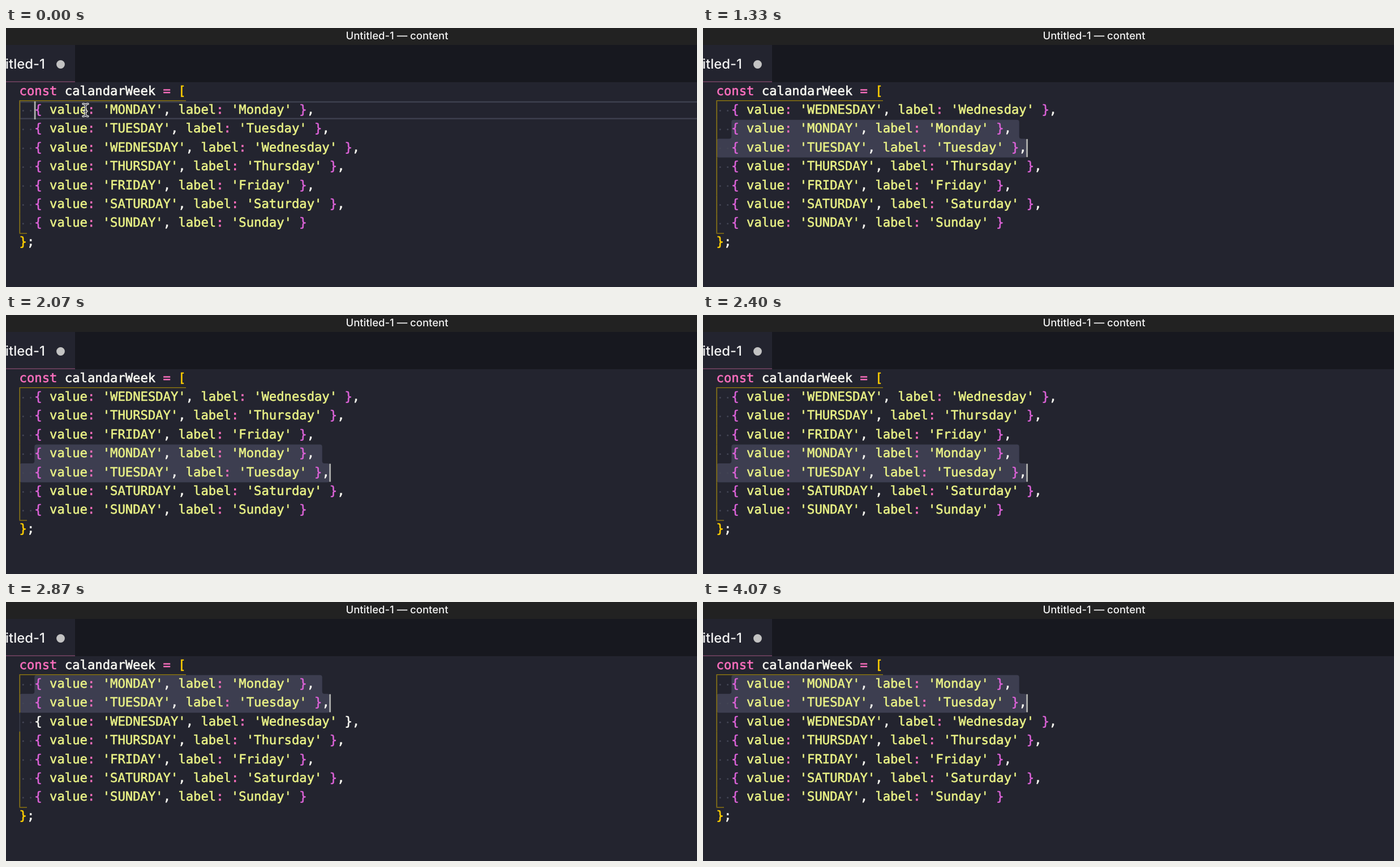
An HTML page for the animation above (4140 ms loop, 1221 px wide and 459 px high).

```html
<!DOCTYPE html>
<html lang="en">
<head>
<meta charset="utf-8">
<title>Moving lines in an editor</title>
<style>
  html, body { margin: 0; width: 100%; height: 100%; overflow: hidden; background: #23242f; }
  svg { display: block; width: 1221px; height: 459px; }
  text { white-space: pre; text-rendering: geometricPrecision; }
  .ui { font-family: Inter, sans-serif; font-weight: 500; fill: #f2f2f2; }
  .code text {
    font: 22.21px "DejaVu Sans Mono", monospace;
    stroke-width: 0.6;
  }
  .code text, .fresh .pair { fill: #f8f8f2; stroke: #f8f8f2; }
  .key { fill: #fb6fbe; stroke: #fb6fbe; }
  .str { fill: #e8f085; stroke: #e8f085; }
  .gold { fill: #ffcf00; stroke: #ffcf00; }
  .pair { fill: #da62d6; stroke: #da62d6; }
  .dots { fill: #434554; }
  .guide { stroke: #8a7410; stroke-width: 1.6; fill: none; }
  .dim { stroke: #3a3c49; }
  .line { fill: none; stroke: #3e404f; stroke-width: 2.4; }
  .sel { fill: #3d3e50; }
  .caret { fill: #aeafad; }
</style>
</head>
<body>
<svg viewBox="0 0 1221 459">
  <defs>
    <path id="beam" fill="none" stroke-linecap="round" d="M136 134.5Q140.5 134.5 140.5 138V153Q140.5 156.5 136 156.5M145 134.5Q140.5 134.5 140.5 138M145 156.5Q140.5 156.5 140.5 153M138 147.5H143"/>
  </defs>
  <rect width="1221" height="459" fill="#23242f"/>
  <rect width="1221" height="31" fill="#222"/>
  <rect y="30" width="1221" height="66" fill="#17181f"/>
  <rect y="30" width="122" height="66" fill="#23242f"/>
  <rect y="94.6" width="122" height="1.4" fill="#7d4768"/>
  <text class="ui" x="691" y="20" font-size="18.5" text-anchor="middle">Untitled-1 — content</text>
  <text class="ui" x="69" y="72" font-size="23.9" text-anchor="end">itled-1</text>
  <circle cx="96.5" cy="64.5" r="7.4" fill="#c3c3c3"/>

  <rect class="line" id="line" x="24.5" y="131" width="1210" height="29.6"/>
  <path class="sel" id="sel"/>
  <path class="guide dim" d="M24.3 129V363"/>
  <g id="guides"></g>
  <path class="guide" d="M23.5 128.8H318M23.5 364H37"/>
  <g class="code" id="code">
    <text x="23.6" y="118.6"><tspan class="key">const</tspan> calandarWeek <tspan class="key">=</tspan> <tspan class="gold">[</tspan></text>
    <text x="23.6" y="385.8"><tspan class="gold">}</tspan>;</text>
  </g>
  <rect class="caret" id="caret" width="2.8" height="32"/>
  <g id="mouse">
    <use href="#beam" stroke="#f4f4f4" stroke-width="3.4"/>
    <use href="#beam" stroke="#20212a" stroke-width="1.2"/>
  </g>
</svg>
<script>
const LOOP = 4140, LEFT = 23.6, CHAR = 13.37, TOP = 96, ROW = 33.4;
const days = ['Monday', 'Tuesday', 'Wednesday', 'Thursday', 'Friday', 'Saturday', 'Sunday'];

// at: start in ms, pos: slot of the moved block, fresh: days awaiting bracket colours
const steps = [
  { at: 0, pos: 0, pick: 'none', fresh: [] },
  { at: 330, pos: 0, pick: 'down', fresh: [] },
  { at: 530, pos: 0, pick: 'full', fresh: [] },
  { at: 1130, pos: 1, pick: 'full', fresh: [2] },
  { at: 1330, pos: 1, pick: 'full', fresh: [] },
  { at: 1530, pos: 2, pick: 'full', fresh: [3] },
  { at: 1670, pos: 3, pick: 'full', fresh: [3, 4] },
  { at: 1930, pos: 3, pick: 'full', fresh: [] },
  { at: 2470, pos: 2, pick: 'full', fresh: [4] },
  { at: 2600, pos: 1, pick: 'full', fresh: [3, 4] },
  { at: 2730, pos: 1, pick: 'full', fresh: [] },
  { at: 2800, pos: 0, pick: 'full', fresh: [2] },
  { at: 3000, pos: 0, pick: 'full', fresh: [] }
];

const $ = id => document.getElementById(id);
const colX = col => LEFT + col * CHAR;
const rowY = row => TOP + row * ROW;
const show = (el, on) => el.setAttribute('visibility', on ? 'visible' : 'hidden');

function add(parent, tag, attrs) {
  const el = document.createElementNS('http://www.w3.org/2000/svg', tag);
  for (const key in attrs) el.setAttribute(key, attrs[key]);
  return parent.appendChild(el);
}

function entry(day, last) {
  const span = (cls, s) => `<tspan class="${cls}">${s}</tspan>`;
  const field = (name, value) => span('str', name) + span('key', ':') + ' ' + span('str', `'${value}'`);
  return span('pair', '{') + ' ' + field('value', day.toUpperCase()) + ', ' +
    field('label', day) + ' ' + span('pair', '}') + (last ? '' : ',');
}

const rows = days.map((day, i) => {
  const g = add($('code'), 'g', {});
  for (const col of [0, 1]) {
    add(g, 'circle', { class: 'dots', cx: colX(col + 0.5), cy: 17, r: 1.5 });
  }
  add(g, 'text', { x: colX(2), y: 22.6 }).innerHTML = entry(day, i === 6);
  return g;
});

const guides = days.map((_, i) =>
  add($('guides'), 'path', { class: 'guide', d: `M24.3 ${rowY(i + 1)}v${ROW}` }));

function selection(row, endCol) {
  const y = rowY(row), mid = y + ROW, end = mid + ROW, r = 4;
  const a = colX(2), b = colX(40) + 0.3, l = LEFT + 0.4, e = colX(endCol);
  const s = Math.sign(e - b) * r;
  return `M${a + r} ${y}H${b - r}q${r} 0 ${r} ${r}V${mid - r}q0 ${r} ${s} ${r}` +
    `H${e - r}q${r} 0 ${r} ${r}V${end - r}q0 ${r} ${-r} ${r}H${l + r}q${-r} 0 ${-r} ${-r}` +
    `V${mid + r}q0 ${-r} ${r} ${-r}H${a - r}q${r} 0 ${r} ${-r}V${y + r}q0 ${-r} ${r} ${-r}Z`;
}

function draw({ pos, pick, fresh }) {
  const order = [2, 3, 4, 5, 6];
  order.splice(pos, 0, 0, 1);
  order.forEach((day, slot) => {
    const isFresh = fresh.includes(day);
    rows[day].setAttribute('transform', `translate(0 ${rowY(slot + 1)})`);
    rows[day].setAttribute('class', isFresh ? 'fresh' : '');
    show(guides[slot], !isFresh);
  });
  const idle = pick === 'none', col = pick === 'full' ? 41 : 2;
  show($('line'), idle);
  show($('mouse'), idle);
  $('sel').setAttribute('d', idle ? '' : selection(pos + 1, col));
  $('caret').setAttribute('x', colX(col) - 0.6);
  $('caret').setAttribute('y', rowY(pos + (idle ? 1 : 2)) + 0.6);
}

let shown;
function tick() {
  const t = performance.now() % LOOP;
  const step = steps.findLast(s => s.at <= t);
  if (step !== shown) draw(shown = step);
  requestAnimationFrame(tick);
}
tick();
</script>
</body>
</html>
```
